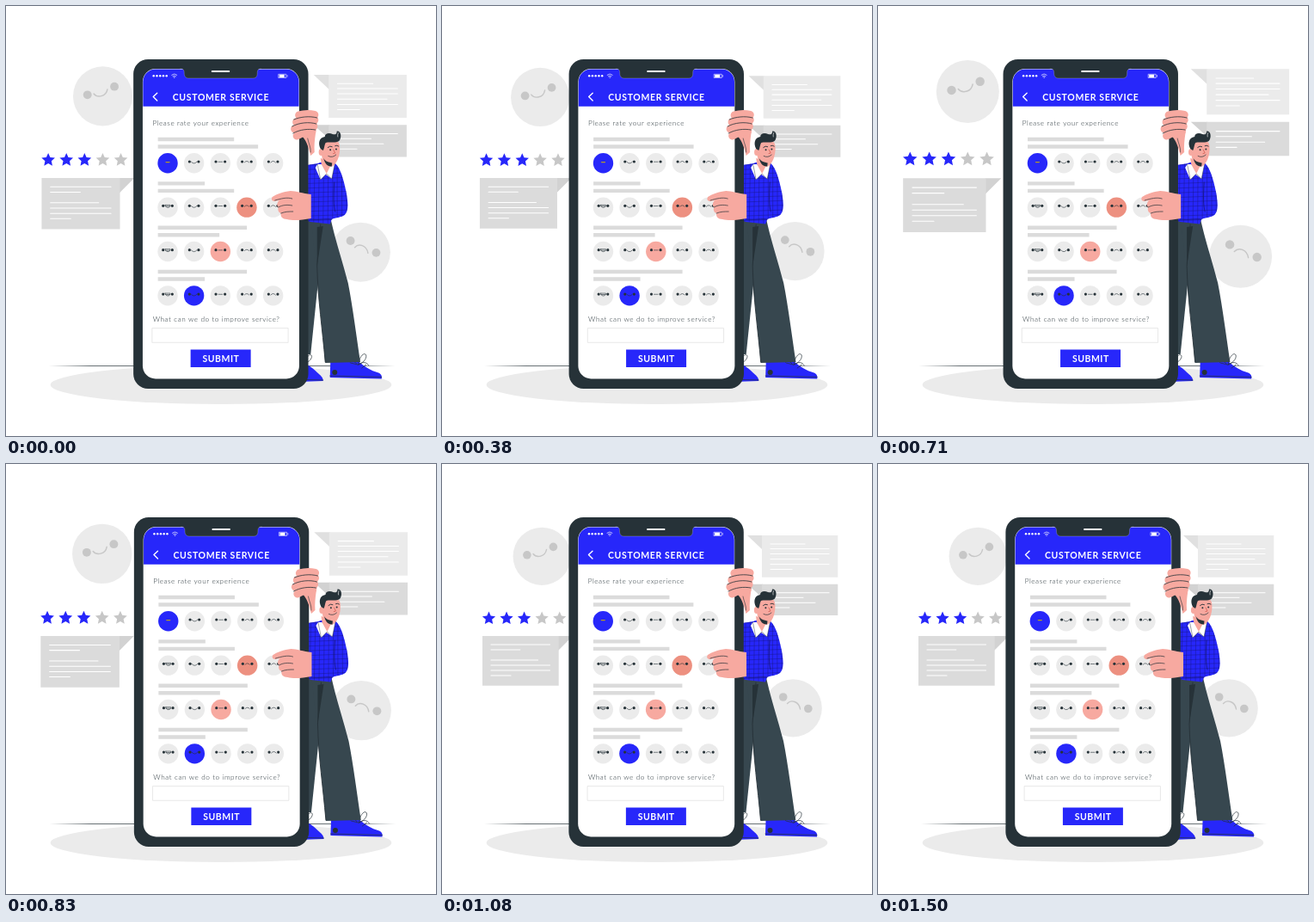
Write an HTML page with a canvas that moves like this. It is 500x500 px and loops after 1.54 s.

```html
<!DOCTYPE html>
<html lang="en">
<head>
<meta charset="utf-8">
<title>Customer service survey</title>
<style>
html, body { margin: 0; width: 100%; height: 100%; overflow: hidden; background: #fff; }
canvas { display: block; width: 500px; height: 500px; }
</style>
</head>
<body>
<canvas id="stage"></canvas>
<script>
const canvas = document.getElementById('stage');
const ctx = canvas.getContext('2d');
const ratio = window.devicePixelRatio || 1;
canvas.width = canvas.height = 500 * ratio;

const LOOP = 1540, STEPS = 37, STEP = 1000 / 24;
const BLUE = '#2727fa', DARK = '#263238', SKIN = '#f7a9a0', CORAL = '#ed9080';
const PALE = '#ebebeb', GREY = '#dbdbdb', MID = '#c7c7c7', TROUSERS = '#37474f';

// Keyframes are [phase, value] pairs joined by straight lines.
const BEAT = [[0, 1], [.1, 1.1], [.3, 1], [.4, 1], [.5, 1.1], [.6, 1], [1, 1]];
const SHAKE = [0, -1, 2, -2, 3.2, -3.8, 2.5, -2.3, 2, -1, 0].map((x, i) => [i / 10, x]);

function tween(keys, phase) {
  const i = Math.max(1, keys.findIndex(key => key[0] >= phase));
  const [t0, v0] = keys[i - 1], [t1, v1] = keys[i];
  return v0 + (v1 - v0) * (phase - t0) / (t1 - t0);
}

function fill(path, color) {
  ctx.fillStyle = color;
  ctx.fill(new Path2D(path));
}

function stroke(path, color = DARK, width = .7) {
  ctx.strokeStyle = color;
  ctx.lineWidth = width;
  ctx.stroke(new Path2D(path));
}

function box(x, y, w, h, color, radius = 0) {
  ctx.fillStyle = color;
  ctx.beginPath();
  ctx.roundRect(x, y, w, h, radius);
  ctx.fill();
}

function oval(x, y, rx, color, ry = rx) {
  ctx.fillStyle = color;
  ctx.beginPath();
  ctx.ellipse(x, y, rx, ry, 0, 0, 7);
  ctx.fill();
}

function label(text, x, y, font, color, spacing, align = 'left') {
  ctx.font = font + ' Lato, sans-serif';
  ctx.letterSpacing = spacing + 'px';
  ctx.textAlign = align;
  ctx.fillStyle = color;
  ctx.fillText(text, x, y);
}

function star(x, y, color) {
  ctx.fillStyle = color;
  ctx.beginPath();
  for (let i = 0; i < 10; i++) {
    const r = i % 2 ? 3.8 : 8, a = i * Math.PI / 5 - Math.PI / 2;
    ctx.lineTo(x + r * Math.cos(a), y + r * Math.sin(a));
  }
  ctx.fill();
}

// Each line is [y, right end].
function textLines(x, lines) {
  for (const [y, end] of lines) stroke(`M${x} ${y}H${end}`, '#fff', 1);
}

function drawBubbles() {
  oval(116.2, 107.3, 33.6, PALE);
  oval(98.9, 105.8, 4.8, MID);
  oval(129.4, 96.4, 4.8, MID);
  stroke('M106 104.5C110 109.5 120 108 121.5 99.5', MID, 1.4);

  oval(408.2, 283.8, 33.6, PALE);
  oval(396.7, 271, 4.8, MID);
  oval(425.8, 284.5, 4.8, MID);
  stroke('M401.5 278.5C406 273.5 415 276 416.5 285', MID, 1.4);

  for (let i = 0; i < 5; i++) star(54.5 + i * 20.55, 179.6, i < 3 ? BLUE : MID);

  fill('M135 200H152L135 217Z', '#d2d2d2');
  box(47, 200, 88.7, 57.8, GREY);
  textLines(57, [[210, 125.5], [216, 90.8], [228, 111.6], [234, 125.5], [240, 125.5], [246, 80]]);

  fill('M355 83H373V100Z', '#e0e0e0');
  box(372, 83, 88.3, 48.8, PALE);
  textLines(382, [[93, 422], [98.6, 450], [104.5, 450], [110.6, 438], [116.6, 450], [122.5, 407]]);

  fill('M355 139.7H373V156Z', '#d2d2d2');
  box(372, 139.7, 88.3, 36.4, GREY);
  textLines(382, [[149.7, 450], [155.3, 420], [161.3, 434], [167, 404]]);
}

function drawGround() {
  const fade = ctx.createLinearGradient(50, 0, 453, 0);
  fade.addColorStop(0, '#26323800');
  fade.addColorStop(.12, DARK);
  fade.addColorStop(.88, DARK);
  fade.addColorStop(1, '#26323800');
  stroke('M50 418.5H453', fade, .7);
}

function drawLegs() {
  fill('M340 415C350 415 356 420 362 426C366 430 369 431 369 436L340 437Z', BLUE);
  stroke('M348 434.5L369 435M349 411C352 403 358 405 355 410C353 414 350 414 348 415');
  fill('M344 250H368L363.5 318L354.5 405H344Z', TROUSERS);

  fill('M377.5 414H411C418 420 425 424 432 426C436 427 438 430 437 433.5L377 432Z', BLUE);
  stroke('M377 430L437 431.5M408 416C401 409 396 411 401 415L409 417M410 417C411 407 417 402 419 406C420 411 414 416 410 417M410 417C415 413 420 414 422 418M414 421L419 417');
  oval(382.5, 426, 3, DARK);

  fill('M355 249L378 248C382 268 393 302 398 322C403.5 350 408 386 412.3 414L371.5 415C368 374 363 336 361 304Z', TROUSERS);
  stroke('M366 254C365 272 363 286 362 302C363 343 368 374 371.5 414', DARK, .9);
  fill('M362 257L369 256L362 302Z', DARK);
}

const SWEATER = 'M344 186L363 183C370 180 378 180 383 183C389 188 393 202 396 217C398 229 399 238 394 243C390 246 384 246 379 248L377 253.5L354 251L344 247Z';

function drawSweater() {
  fill(SWEATER, BLUE);
  ctx.save();
  ctx.clip(new Path2D(SWEATER));
  let grid = '';
  for (let i = 0; i < 13; i++) {
    grid += `M${349 + i * 5.2} 180L${347 + i * 5.5} 254M345 ${185 + i * 5.4}L400 ${183 + i * 5.4}`;
  }
  stroke(grid, '#15157aaa', .6);
  ctx.restore();
  stroke('M382 205C381 222 381 232 383 239M354 248C364 249 373 247 379 248', '#15156b', .7);
}

function drawHead() {
  fill('M366 177L368 190L373 197L379 188L380 181Z', SKIN);
  fill('M362.5 184L367 184L373 195L366 202L360 188ZM380 181L382.5 184L379 201L372.5 196Z', '#fff');
  stroke('M362.5 184L366 202L373 195L379 201L382.5 184', DARK, .45);

  fill('M368 157C375 153 386 154 388 161C389.5 170 387 181 380 186.5C373 188 367 180 367 170Z', SKIN);
  oval(366.7, 170, 2.8, SKIN, 4);
  fill('M366 166C363 160 364 153 371 152C371 148 376 147 380 149C383 150 385 149 385 145.5C390 145 391 153 387.5 157C383 160 377 157.5 372 159C370.5 161 370.5 166 369 168Z', DARK);
  stroke('M386.5 147.5Q385.5 150 386 152', '#fff', .6);
  oval(377.4, 167.3, 1, DARK);
  oval(384.2, 166.5, 1, DARK);
  stroke('M374.5 164.5Q377 162 379.5 163.6M383 162.6Q385 161.5 387 163', DARK, .9);
  stroke('M381 167L383 171L380.8 171.6', '#d6665c', .9);
  stroke('M375 174.5Q380 177 384 173', DARK, .7);
  fill('M369.5 177C372 181.5 376 181.5 379.5 182.5L379 186.5C374 187 371 183 369.5 177Z', DARK);
}

const FACE_X = [188.3, 218.9, 249.6, 280.2, 310.9];
const MOUTHS = [
  'M-3 -2.8H3C3 1.2 -3 1.2 -3 -2.8M-2.6 -1.3H2.6',
  'M-3.2 -1.6Q0 2.2 3.2 -1.6',
  'M-2.3 -1.6H2.3',
  'M-2.6 -1Q0 -3.8 2.6 -1',
  'M-2.8 -.8Q0 -4.2 2.8 -.8'
];
// Each row holds its two bar widths, the chosen face and the colour of that face.
const ROWS = [
  [88.6, 116.5, 0, BLUE],
  [54.5, 88.6, 3, CORAL],
  [103.5, 71.5, 2, SKIN],
  [103.5, 54.5, 1, BLUE]
];

function drawFace(x, y, kind, color) {
  ctx.save();
  ctx.translate(x, y);
  oval(0, 0, 11.7, color);
  if (kind === 0 && color === BLUE) {
    stroke('M-2 -1.2H2', '#b59a24', 1.2);
  } else {
    oval(-5.3, -1.8, 1.6, DARK);
    oval(5.3, -1.8, 1.6, DARK);
    stroke(MOUTHS[kind], DARK, .6);
  }
  ctx.restore();
}

function drawRows() {
  ROWS.forEach(([first, second, chosen, color], row) => {
    const y = row * 51.35;
    box(176.9, 152.8 + y, first, 4.4, GREY);
    box(176.9, 161.3 + y, second, 4.4, GREY);
    FACE_X.forEach((x, i) => drawFace(x, 182.8 + y, i, i === chosen ? color : PALE));
  });
}

function drawPhone() {
  box(148.4, 62, 203.4, 383, DARK, 17);
  box(159.2, 73, 182, 360.5, '#fff', 15);
  ctx.save();
  ctx.beginPath();
  ctx.roundRect(159.6, 73.4, 181.2, 359.8, 14.6);
  ctx.clip();
  box(159, 73, 183, 43.8, BLUE);
  ctx.restore();
  const notch = 'M203 73C207 73 207.5 75 207.5 78C207.5 82 209.5 84 213 84H287C291 84 292.5 82 292.5 78C292.5 75 293 73 297 73';
  fill(notch + 'V71H203Z', DARK);
  stroke(notch, '#ffffff88', .4);
  stroke('M240 76H259.5', '#fff', 2);

  for (let i = 0; i < 5; i++) oval(172 + i * 3.75, 81.3, 1.2, '#fff');
  stroke('M193 80.2Q196 77.7 199 80.2M194.3 81.8Q196 80.5 197.7 81.8', '#fff', .7);
  oval(196, 83.1, .7, '#fff');
  stroke('M317.4 79.3H326V83.5H317.4ZM327.4 80.5V82.3', '#fff', .6);
  box(318, 79.8, 6, 3.2, '#fff');
  stroke('M176 101.2L171.5 105.6L176 110', '#fff', 1.4);

  label('CUSTOMER SERVICE', 194, 109.5, '700 10.5px', '#fff', .65);
  label('Please rate your experience', 170.7, 138.9, '300 8.2px', DARK, .55);
  drawRows();
  label('What can we do to improve service?', 170.9, 367.2, '300 8.2px', DARK, .57);
  stroke('M170.5 374.6H328.4V391.3H170.5Z', '#dedede', .7);
  box(214.9, 399.6, 70, 20.4, BLUE);
  label('SUBMIT', 250.2, 413.9, '700 10.5px', '#fff', .5, 'center');
}

function drawHands() {
  fill('M343 150L362 132C362 143 358 155 359 170L354.5 174C352 164 350 158 346 153Z', SKIN);
  stroke('M341 127Q350 124.5 359 126.5M338 135Q348 130.5 359 132.5M336 143Q346 138 358 140M338.5 151Q346 146 356 146', SKIN, 9.2);
  stroke('M335 132C342 129 353 127.5 362 130M333 140C341 135.5 353 134.5 361 137M334 148C342 143.5 352 142.5 360 144', DARK, .8);
  stroke('M351 154C352 160 355 164 354.5 170', DARK, .6);

  fill('M355 219C345 218 338 215 331 215C323 216 314 219 310 222C308 225 310 227 313 227L318 226C315 229 315 232 317 234C316 237 317 240 320 241C319 245 322 248 327 248C334 250 344 249 355 247Z', SKIN);
  stroke('M313 226C320 224 327 222 333 224M317 234C322 231 328 231 333 232M320 241C325 239 329 239 334 239', DARK, .7);
}

function draw(now) {
  const step = Math.min(STEPS - 1, Math.floor((now % LOOP + 5) / STEP));
  const phase = (step + 1) / STEPS;
  const scale = tween(BEAT, phase);

  ctx.setTransform(ratio, 0, 0, ratio, 0, 0);
  ctx.lineCap = ctx.lineJoin = 'round';
  box(0, 0, 500, 500, '#fff');
  oval(250, 440.5, 198.3, PALE, 22.5);

  ctx.save();
  ctx.translate(253.5, 197);
  ctx.scale(scale, scale);
  ctx.translate(-253.5, -197);
  drawBubbles();
  ctx.restore();

  ctx.translate(tween(SHAKE, phase), 0);
  drawGround();
  drawLegs();
  drawSweater();
  drawHead();
  drawPhone();
  drawHands();
}

const start = performance.now();
function tick() {
  draw(performance.now() - start);
  requestAnimationFrame(tick);
}
tick();
</script>
</body>
</html>
```
